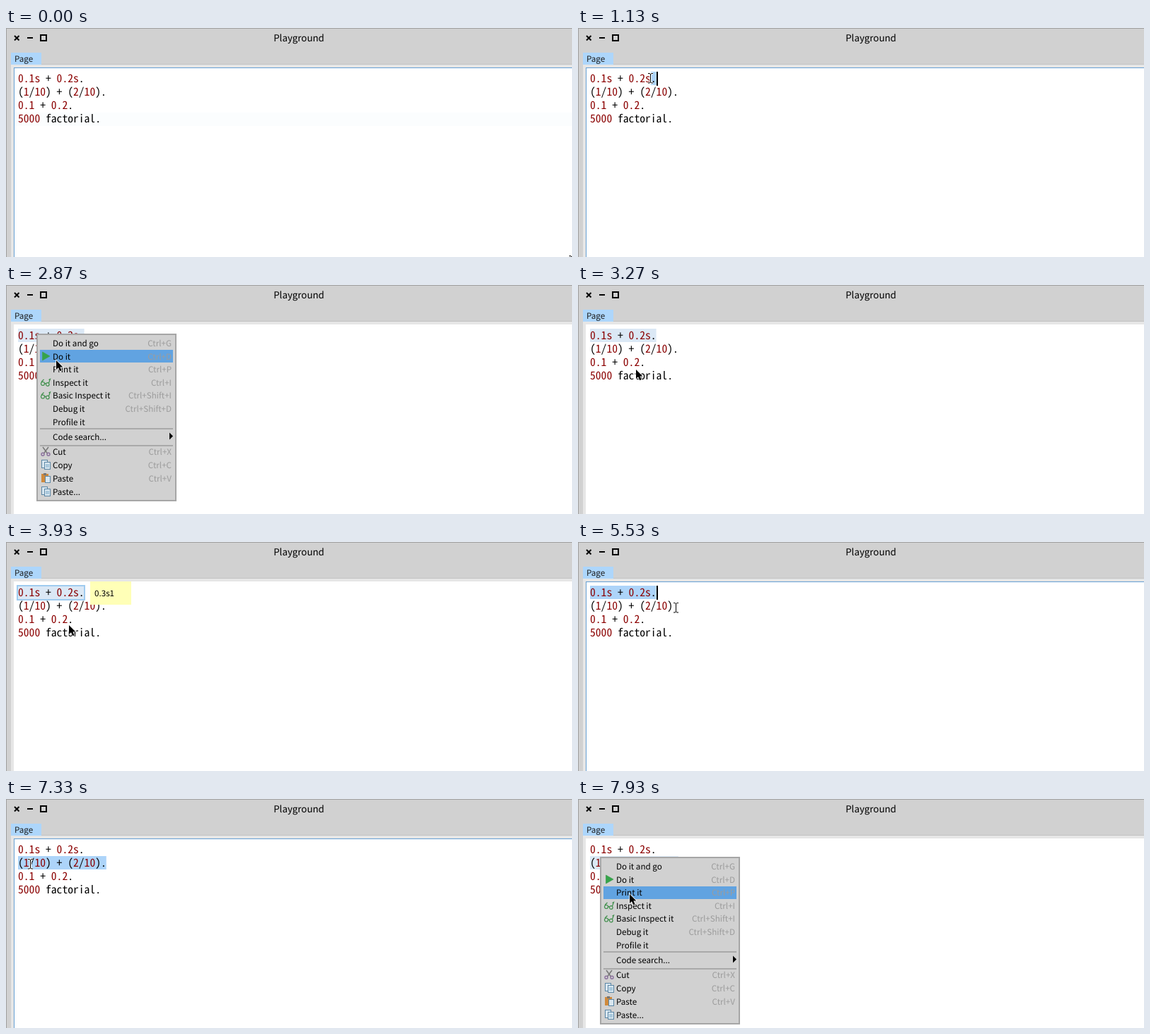
An HTML page with a canvas for the animation above (8000 ms loop, 800 px wide and 325 px high).

```html
<!DOCTYPE html>
<html lang="en">
<head>
<meta charset="utf-8">
<title>Playground</title>
<style>
  html, body { margin: 0; width: 100%; height: 100%; overflow: hidden; background: #d1d1d1; }
  canvas { display: block; }
</style>
</head>
<body>
<canvas id="stage" width="800" height="325"></canvas>
<script>
const ctx = document.getElementById('stage').getContext('2d');
ctx.textRendering = 'geometricPrecision';

const LOOP = 8000, STEP = 1000 / 15;
const UI = '"Noto Sans CJK JP", "Noto Sans CJK SC", "Open Sans", sans-serif';
const MONO = '"Noto Sans Mono CJK JP", "Noto Sans Mono CJK SC", "DejaVu Sans Mono", monospace';
const uiFont = `11.64px ${UI}`, titleFont = `13.3px ${UI}`;

// Code sits on a fixed character grid, so the size follows from the advance.
const LEFT = 17, CHAR = 7.8;
ctx.font = `100px ${MONO}`;
const codeFont = `${(CHAR * 100 / ctx.measureText('0').width).toFixed(2)}px ${MONO}`;

const code = ['0.1s + 0.2s.', '(1/10) + (2/10).', '0.1 + 0.2.', '5000 factorial.'];
const lineTop = row => 62 + 19 * row;
const lineEnd = row => LEFT + code[row].length * CHAR;

const menuItems = [
  { label: 'Do it and go', keys: 'Ctrl+G', y: 13 },
  { label: 'Do it', keys: 'Ctrl+D', y: 31.5, icon: playIcon },
  { label: 'Print it', keys: 'Ctrl+P', y: 50 },
  { label: 'Inspect it', keys: 'Ctrl+I', y: 68.5, icon: glassesIcon },
  { label: 'Basic Inspect it', keys: 'Ctrl+Shift+I', y: 87, icon: glassesIcon },
  { label: 'Debug it', keys: 'Ctrl+Shift+D', y: 106 },
  { label: 'Profile it', keys: '', y: 124.5 },
  { label: 'Code search...', keys: '', y: 145.5, submenu: true },
  { label: 'Cut', keys: 'Ctrl+X', y: 166.5, icon: scissorsIcon },
  { label: 'Copy', keys: 'Ctrl+C', y: 185.5, icon: copyIcon },
  { label: 'Paste', keys: 'Ctrl+V', y: 204.5, icon: pasteIcon },
  { label: 'Paste...', keys: '', y: 223.5, icon: copyIcon }
];

// Pointer keys: time, x, y
const pointerPath = [
  [0, 801, 331], [70, 770, 312], [330, 470, 170], [600, 240, 92], [870, 151, 73],
  [930, 149, 73], [1200, 88, 70], [1530, 22, 59], [1600, 22, 59], [2000, 47, 75],
  [2200, 47, 75], [2400, 44, 78], [2470, 44, 78], [2870, 71, 107], [3000, 82, 120],
  [3540, 82, 120], [3730, 88, 121], [3800, 88, 121], [3930, 89, 118],
  [4330, 89, 118], [5200, 138, 93], [5930, 138, 93], [6330, -6, 78],
  [6670, -6, 78], [6730, -6, 91], [7000, -6, 91], [7330, 34, 92],
  [7470, 34, 92], [7930, 73, 135], [8000, 73, 135]
];

function pointerAt(t) {
  const i = pointerPath.findIndex(key => key[0] > t);
  const [t0, x0, y0] = pointerPath[i - 1], [t1, x1, y1] = pointerPath[i];
  const k = (t - t0) / (t1 - t0);
  return { x: Math.round(x0 + (x1 - x0) * k), y: Math.round(y0 + (y1 - y0) * k) };
}

const within = (t, from, to) => t >= from && t < to;

function rect(x, y, w, h, color) {
  ctx.fillStyle = color;
  ctx.fillRect(x, y, w, h);
}

function frame(x, y, w, h, thick, color) {
  ctx.strokeStyle = color;
  ctx.lineWidth = thick;
  ctx.strokeRect(x + thick / 2, y + thick / 2, w - thick, h - thick);
}

function text(str, x, y, font = uiFont, color = '#000', align = 'left') {
  ctx.font = font;
  ctx.fillStyle = color;
  ctx.textAlign = align;
  ctx.fillText(str, x, y);
}

function shape(d, fill, stroke, width = 1) {
  const path = new Path2D(d);
  if (stroke) {
    ctx.strokeStyle = stroke;
    ctx.lineWidth = width;
    ctx.stroke(path);
  }
  if (fill) {
    ctx.fillStyle = fill;
    ctx.fill(path);
  }
}

function at(x, y, draw) {
  ctx.save();
  ctx.translate(x, y);
  draw();
  ctx.restore();
}

// Icons are centred on their own origin.
function playIcon() { shape('M-4.5-6L6 0L-4.5 6Z', '#35a34a', '#4f9f5c', .8); }

function glassesIcon() {
  shape('M-6.5 2a2.5 2.5 0 1 0 5 0a2.5 2.5 0 1 0-5 0M.5 3a2.3 2.3 0 1 0 4.6 0a2.3 2.3 0 1 0-4.6 0' +
    'M-1.5 2Q-.5 1 .5 2.5M-6-.5L-2.5-4M4.5 1L6.5-4.5L4.5-3.5', null, '#3f8f4b', 1.2);
}

function scissorsIcon() {
  shape('M-4-6L2.5 3M4-6L-2.5 3', null, '#777', 1.5);
  shape('M-6 4.3a2 2 0 1 0 4 0a2 2 0 1 0-4 0M2 4.3a2 2 0 1 0 4 0a2 2 0 1 0-4 0', null, '#8a6f9c', 1.4);
}

function sheet(x, y, w, h) {
  rect(x, y, w, h, '#d9e7f0');
  frame(x, y, w, h, 1, '#5b86a5');
}

function copyIcon() {
  sheet(-6, -7, 9, 12);
  sheet(-2, -4, 9, 11);
  rect(0, -1, 5, 5, '#a9c8dc');
}

function pasteIcon() {
  rect(-6, -6, 10, 12, '#d08a3c');
  rect(-3, -7, 4, 3, '#777');
  sheet(-1, -3, 8, 10);
}

function drawWindow(focused) {
  rect(0, 0, 800, 325, '#d1d1d1');
  rect(0, 0, 800, 1, '#a0a0a0');
  rect(0, 0, 1, 325, '#a0a0a0');
  shape('M12 11L18.5 17.5M18.5 11L12 17.5M30 14H38', null, '#000', 2);
  frame(48, 9, 10, 10, 2, '#000');
  text('Playground', 414, 19, titleFont, '#000', 'center');
  rect(7, 51, 793, 274, '#e6e6e6');
  rect(50, 51, 750, 1, '#c2c2c2');
  rect(7, 35, 43, 17, '#add6fb');
  text('Page', 12, 48, uiFont, '#1c1c1c');
  rect(11, 56, 789, 269, '#fff');
  if (focused) {
    rect(11, 56, 789, 1, '#659fd3');
    rect(11, 56, 1, 269, '#659fd3');
  }
}

// A drag runs backwards from the end of `row` to the pointer.
function drawSelection(row, pointer, color) {
  const startRow = pointer.y < lineTop(1) ? 0 : row;
  const col = Math.max(0, Math.min(code[startRow].length, Math.round((pointer.x - LEFT) / CHAR)));
  let x = LEFT + col * CHAR;
  for (let r = startRow; r <= row; r++) {
    const right = r < row ? 800 : lineEnd(row);
    rect(x, lineTop(r), right - x, 19, color);
    x = LEFT - 1;
  }
}

function drawCode() {
  code.forEach((line, row) => {
    for (const part of line.matchAll(/\d+(?:\.\d+)?s?|[^\d]+/g)) {
      const color = /^\d/.test(part[0]) ? '#8b0000' : '#000';
      text(part[0], LEFT + part.index * CHAR, 77 + 19 * row, codeFont, color);
    }
  });
}

function drawCaret(row) {
  rect(Math.round(lineEnd(row)) - (row === 1 ? 1 : 0), lineTop(row) + (row === 3 ? 1 : 0), 2, 20, '#000');
}

function drawPopup() {
  rect(119, 56, 58, 33, '#ffffb7');
  text('0.3s1', 125, 77);
}

function drawMenu(x, y, pointer) {
  const hovered = Math.floor((pointer.y - y - 4) / 18.6);
  at(x, y, () => {
    rect(0, 0, 198, 238, '#d1d1d1');
    frame(0, 0, 198, 238, 2, '#a6a6a6');
    for (const line of [134, 158]) rect(5, line, 188, 2, '#a9a9a9');
    menuItems.forEach((item, i) => {
      if (i === hovered) rect(5, Math.round(item.y - 8.5), 188, 18, '#61a3e1');
      if (item.icon) at(13, item.y + .5, item.icon);
      text(item.label, 23, item.y + 5);
      text(item.keys, 191, item.y + 5, uiFont, '#9c9c9c', 'right');
      if (item.submenu) shape(`M188 ${item.y - 5}L193 ${item.y}L188 ${item.y + 5}Z`, '#000');
    });
  });
}

function drawPointer({ x, y }, arrow) {
  at(x, y, () => {
    if (arrow) {
      shape('M0 0V13L3 10.3L5.2 15.3L7.6 14.2L5.4 9.4H9.4Z', '#000', '#fff', 1.4);
    } else {
      const beam = 'M-3-6.5H-1L.5-5.5L2-6.5H4M.5-5.5V6M-3 7H-1L.5 6L2 7H4';
      shape(beam, null, '#fff', 3);
      shape(beam, null, '#000', 1);
    }
  });
}

function draw(time) {
  const t = Math.floor((time + 5) / STEP) * STEP + 4;
  const pointer = pointerAt(Math.min(t, LOOP - 1));
  const firstMenu = within(t, 2470, 3270), secondMenu = t >= 7470;
  const popup = within(t, 3330, 5530);
  const busy = within(t, 2470, 5530) || secondMenu;
  const selectColor = busy ? '#dbe8f5' : '#add4f9';

  drawWindow(!busy);
  if (t < 930) rect(12, 120, 788, 19, '#fbfdfe');
  if (popup) {
    rect(15, 61, 97, 22, '#dbe8f5');
    frame(15, 61, 97, 22, 2, '#9fcbef');
  } else if (within(t, 930, 5930)) {
    drawSelection(0, t < 1530 ? pointer : { x: 0, y: 0 }, selectColor);
  } else if (t >= 5930) {
    drawSelection(1, t < 6800 ? pointer : { x: 0, y: 91 }, selectColor);
  }
  drawCode();

  if (within(t, 470, 930)) drawCaret(3);
  if (within(t, 930, 1500) || within(t, 5530, 5930)) drawCaret(0);
  if (within(t, 5930, 6730)) drawCaret(1);
  if (popup) drawPopup();
  if (firstMenu) drawMenu(43, 69, pointer);
  if (secondMenu) drawMenu(31, 82, pointer);
  drawPointer(pointer, busy);
}

const start = performance.now();
function tick() {
  draw((performance.now() - start) % LOOP);
  requestAnimationFrame(tick);
}
tick();
</script>
</body>
</html>
```
